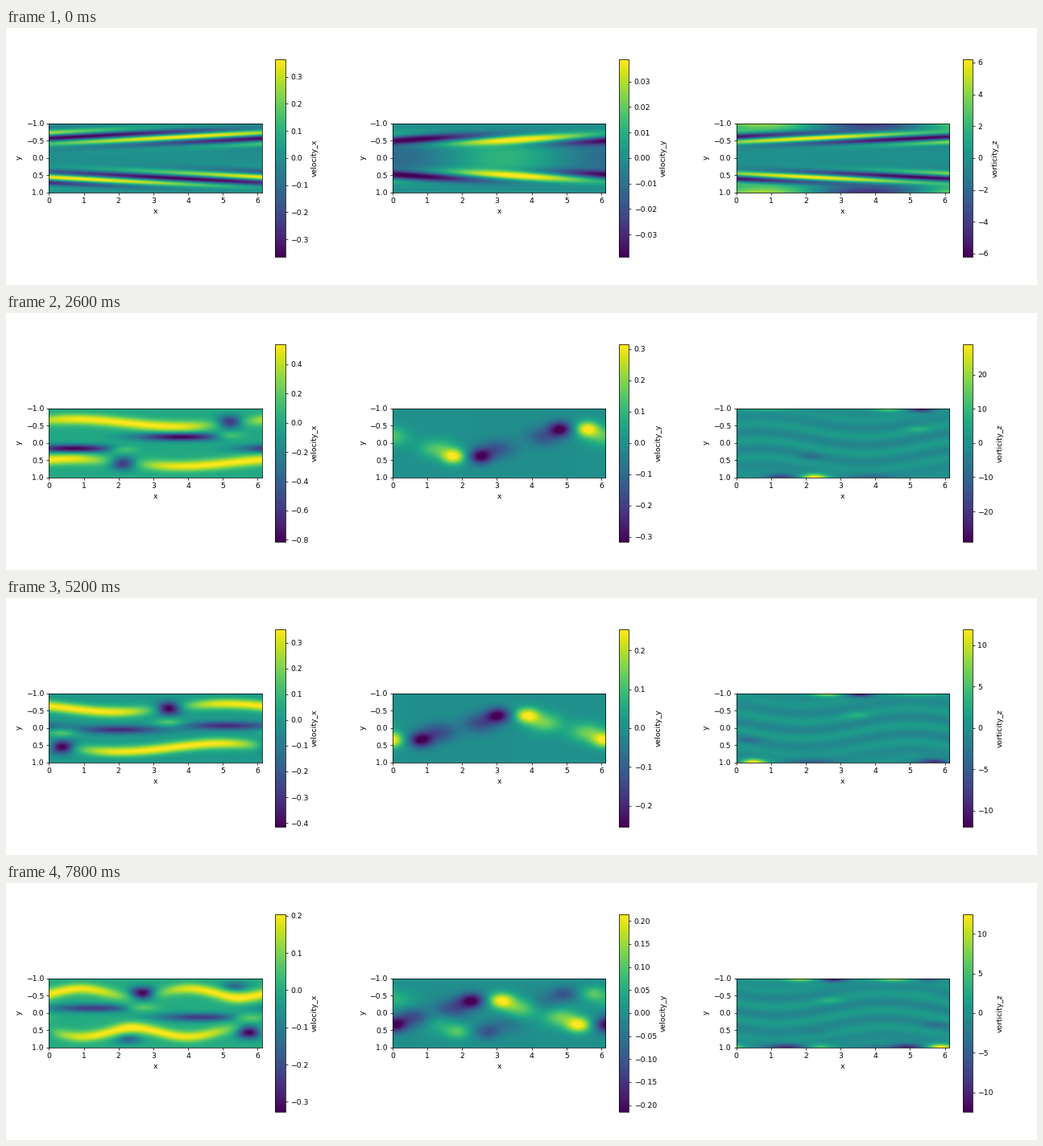
Animation, 1280 px wide and 320 px high, one loop 8000 ms. Source, as a matplotlib script:

```python
import numpy as np
import matplotlib.pyplot as plt
from matplotlib.animation import FuncAnimation

STAGE_W, STAGE_H = 1280, 320
FRAMES, STEP = 40, 200
W = 6.126                # visible length of the periodic channel
K = 2 * np.pi / W
NAMES = ["velocity_x", "velocity_y", "vorticity_z"]
PARITY = [1, -1, -1]     # under (x, y) -> (x + W/2, -y)

# time, vortex position, depth of the slow streak, then the colour limits:
# -min and max of velocity_x, max of velocity_y, max of vorticity_z
PATH = np.array([
    [0.0, 2.15, -.40, .364, .364, .0387, 6.20],
    [1.0, 3.15, -.40, .515, .405, .247, 29.7],
    [2.6, 5.20, -.17, .814, .537, .3154, 28.9],
    [4.4, 8.03, 0.00, .474, .488, .289, 12.46],
    [5.8, 10.73, .10, .376, .277, .2316, 11.58],
    [7.0, 13.25, .00, .336, .220, .1937, 9.61],
    [7.8, 14.95, -.13, .327, .204, .2143, 12.46]])

x, y = np.meshgrid((np.arange(200) + 0.5) / 200 * W,
                   (np.arange(80) + 0.5) / 40 - 1)
no_slip = 1 - y ** 10


def spot(dx, dy, length, height):
    """Gaussian patch, periodic along the channel."""
    dx = (dx + W / 2) % W - W / 2
    return np.exp(-(dx / length) ** 2 - (dy / height) ** 2)


def ramp(t, start, end):
    u = np.clip((t - start) / (end - start), 0, 1)
    return u * u * (3 - 2 * u)


def waves(px, py):
    """Tilted linear waves that start the motion, upper half."""
    def band(mid, width, offset, tilt):
        return np.exp(-((py - mid) / width) ** 2) * np.cos(
            K * (px + offset + py / tilt))

    vx = band(-.60, .23, .37 / .0588, .0588)
    vy = (band(-.53, .17, 9 * .53 - 3.75, 1 / 9)
          + .15 * np.exp(-(py / .5) ** 4) * np.cos(K * (px - 3.2)))
    wz = (band(-.56, .18, .43 / .0588, .0588)
          + .72 * spot(0, py + 1, 1, .2) * np.cos(K * (px - .7)))
    return vx, vy, wz


def vortex(dx, py, mid, size, age):
    """Slow core with a dipole of up and down flow and its wall layer."""
    vx = -.8 * spot(dx, py - mid, .38, .19) \
        + .45 * spot(dx, py - mid - .4, .42, .11)
    vy = 0
    for side in (-1, 1):
        vy = vy + side * (
            spot(dx - .42 * side * size, py - mid - .2, .36 * size, .22)
            + .55 * size ** 2
            * spot(dx - .95 * side * size, py - mid - .42, .5, .28))
    wz = -spot(dx - .1, py + 1, .38, .11) \
        + .2 * spot(dx, py - mid - .2, .35, .09) \
        + age * (.75 * spot(dx + .85, py + 1, .45, .11)
                 + .4 * spot(dx - 1.8, py + 1, .7, .1))
    return np.array([vx, vy, wz])


def flow(dx, py, t, depth):
    """Upper half of the travelling pattern; dx is measured from the core."""
    t = max(t, 1)
    young = np.exp(1 - t)
    late = ramp(t, 5.6, 7)
    mid = -.55 - .22 * young
    size = 1 - .4 * young
    vx, vy, wz = (vortex(dx, py, mid, size, 1 - young)
                  + .45 * late * vortex(dx - 2.65, py, -.75, 1, 1))

    # fast streak that meanders past the vortices
    bend = (1 - late) * np.cos(K * (dx - 1.6)) \
        + late * np.cos(2 * K * (dx - 1.3))
    centre = -.57 - .12 * (1 - .6 * young) * bend
    gap = .85 * spot(dx, 0, .9, 1)
    vx = vx + (1 - gap) * np.exp(-((py - centre) / .16) ** 2)

    # slow streak nearer the middle
    slow = .5 + .6 * np.exp(-(t / 3.5) ** 4)
    vx = vx - slow * spot(dx - 4.7, py - depth, 1.2, .12)

    # thin filaments
    wz = wz + .05 * (1 - py ** 2) * np.sin(13 * py + 2.5 * np.sin(K * dx))
    return vx, vy, wz


def fields(t):
    _, core, depth = [np.interp(t, PATH[:, 0], c) for c in PATH.T[:3]]
    limits = [np.exp(np.interp(t, PATH[:, 0], np.log(c))) for c in PATH.T[3:]]
    lows = [limits[0], limits[2], limits[3]]
    grown = min(t, 1)

    def half(px, py):
        shift = core - PATH[0, 1]
        return [(1 - grown) * a + grown * b for a, b in
                zip(waves(px - shift, py), flow(px - core, py, t, depth))]

    upper, lower = half(x, y), half(x + W / 2, -y)
    for p, (lo, hi) in enumerate(zip(lows, limits[1:])):
        n = np.clip(upper[p] + PARITY[p] * lower[p], -1, 1)
        if p < 2:
            n = n * no_slip
        yield np.where(n > 0, n * hi / n.max(), -n * lo / n.min()), -lo, hi


def box(left, top, width, height):
    return [left / STAGE_W, 1 - (top + height) / STAGE_H,
            width / STAGE_W, height / STAGE_H]


fig = plt.figure(figsize=(19.2, 4.8), dpi=200 / 3, facecolor="white")
images = []
for p, name in enumerate(NAMES):
    left = 53.4 + 426.6 * p
    ax = fig.add_axes(box(left, 118.5, 264.4, 86.3))
    im = ax.imshow(np.zeros_like(x), extent=[0, W, 1, -1], aspect="auto",
                   cmap="viridis", interpolation="bilinear", vmin=-1, vmax=1)
    ax.set_xticks(range(7))
    ax.set_yticks(np.arange(-1, 1.1, 0.5))
    ax.set_xlabel("x")
    ax.set_ylabel("y")
    cax = fig.add_axes(box(left + 280.9, 38.9, 12.3, 246))
    fig.colorbar(im, cax=cax, label=name)
    images.append(im)


def update(frame):
    for im, (data, lo, hi) in zip(images, fields(frame * STEP / 1000)):
        im.set_data(data)
        im.set_clim(lo, hi)
    return images


anim = FuncAnimation(fig, update, frames=FRAMES, interval=STEP,
                     repeat=True, repeat_delay=0, blit=False)
plt.show()
```
